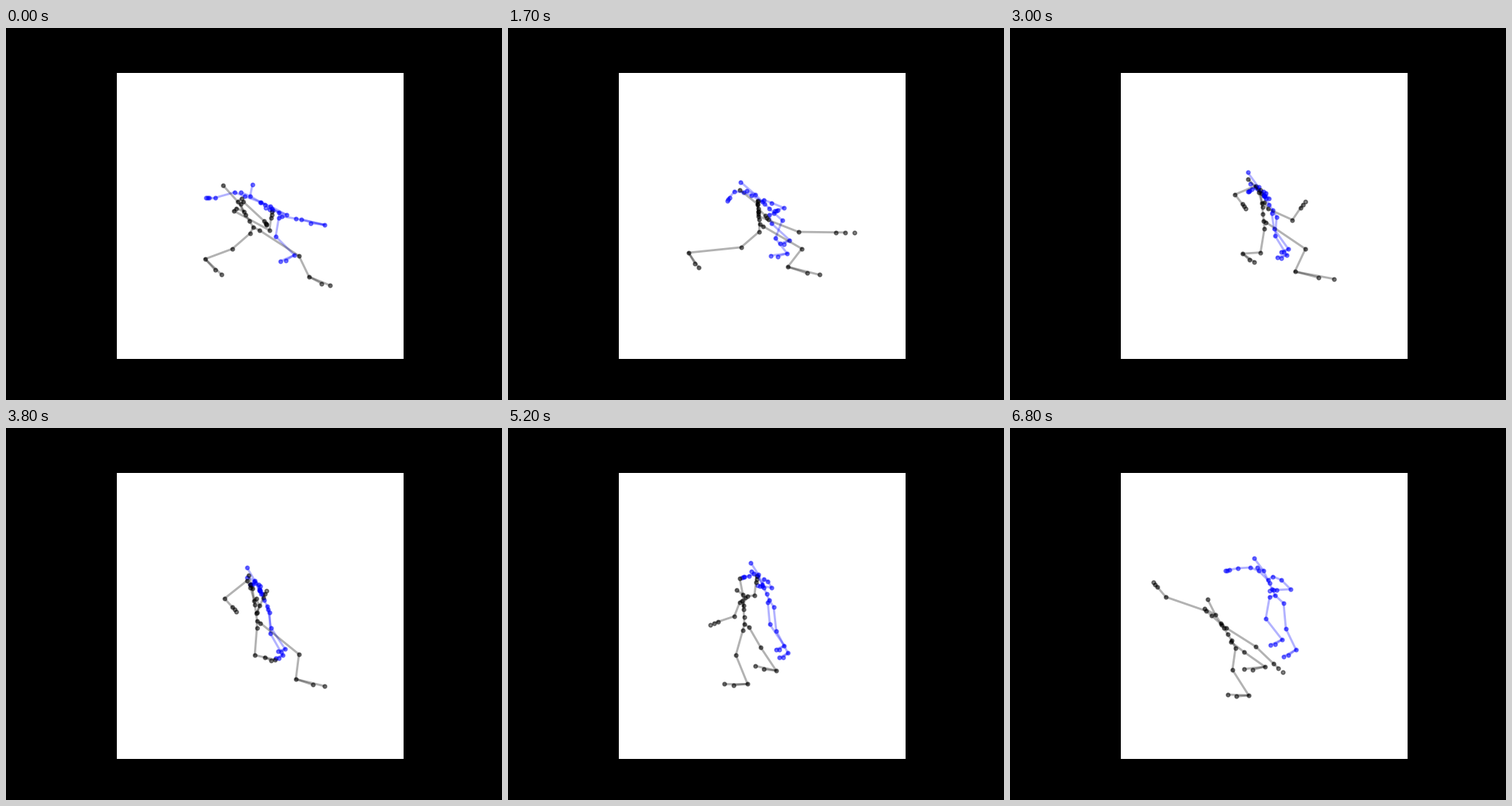
Animation, 640 px wide and 480 px high, one loop 6.9 s. Source, as a matplotlib script:

```python
import numpy as np
import matplotlib.pyplot as plt
from matplotlib.animation import FuncAnimation
from matplotlib.collections import LineCollection

STEP, FRAMES = 100, 69
TIMES = np.arange(FRAMES) * STEP


def path(keys):
    """Smooth curve through {time: x + yj}, sampled once per frame."""
    t = np.array(sorted(keys), float)
    p = np.array([keys[k] for k in sorted(keys)])
    m = np.gradient(p, t)
    i = np.clip(np.searchsorted(t, TIMES, side="right") - 1, 0, len(t) - 2)
    h = t[i + 1] - t[i]
    u = (TIMES - t[i]) / h
    return ((1 + 2 * u) * (1 - u) ** 2 * p[i] + u * (1 - u) ** 2 * h * m[i]
            + u * u * (3 - 2 * u) * p[i + 1] + u * u * (u - 1) * h * m[i + 1])


class Body:
    """Stick figure: a few joints follow paths, the others are placed from them."""

    def __init__(self, ax, color, trunk, arms, legs, shoulder):
        self.joints, self.bones = [], []
        pelvis, neck, head, face, across, hips = map(path, trunk)
        self.chain(*[pelvis + f * (neck - pelvis) for f in (0, 0.25, 0.5, 0.62, 1)], head)
        self.chain(neck, neck + face)
        chest = pelvis + 0.62 * (neck - pelvis)
        for side, (elbow, wrist) in zip((1, -1), arms):
            elbow, wrist = path(elbow), path(wrist)
            mid, half = neck + shoulder, side * across
            reach = wrist - elbow
            self.chain(chest, mid + 0.45 * half, mid + half, elbow, wrist, wrist + 0.25 * reach)
            self.joints.append(wrist + 0.5 * reach)
        for side, (knee, ankle, foot) in zip((1, -1), legs):
            ankle, foot = path(ankle), path(foot)
            self.chain(pelvis, pelvis + 2 + 6j + side * hips, path(knee), ankle, ankle + foot)
            self.chain(ankle, ankle + 0.6 * foot + 2j)
        self.joints = np.array(self.joints)
        self.lines = LineCollection([], colors=color, linewidths=2, alpha=0.3,
                                    capstyle="projecting")
        ax.add_collection(self.lines)
        self.dots = ax.scatter([], [], s=12, c=color, linewidths=1, alpha=0.5)

    def chain(self, *points):
        """Connect points in a row; a first point already in place is shared."""
        last = None
        for p in points:
            same = [i for i, q in enumerate(self.joints) if np.allclose(p, q)]
            if last is None and same:
                last = same[0]
                continue
            self.joints.append(p)
            if last is not None:
                self.bones.append((last, len(self.joints) - 1))
            last = len(self.joints) - 1

    def pose(self, i):
        z = self.joints[:, i]
        xy = np.column_stack([z.real, z.imag])
        self.lines.set_segments([xy[[a, b]] for a, b in self.bones])
        self.dots.set_offsets(xy)


fig = plt.figure(figsize=(6.4, 4.8), dpi=100, facecolor="black")
ax = fig.add_axes([143.2 / 640, 0.11, 369.6 / 640, 0.77])
ax.set(xlim=(143.2, 512.8), ylim=(427.2, 57.6), xticks=[], yticks=[])
ax.spines[:].set_visible(False)

# trunk: pelvis, neck, head, then face, shoulder and hip directions
blue = Body(
    ax, "blue", shoulder=3 + 4j,
    trunk=[
        {0: 352+238j, 2300: 341+238j, 5200: 337+222j, 6800: 342+216j},
        {0: 315+217j, 2300: 320+212j, 3800: 321+197j, 5200: 323+189j, 6800: 327+184j},
        {0: 318+202j, 1000: 303+202j, 3800: 311+180j, 6800: 315+168j},
        {0: -12-5j, 6800: -8-4j},
        {0: -23-9j, 1000: -22-8j, 3600: -4-3j, 6800: -20-8j},
        {0: 2-1j, 1000: -7-3j, 3800: -1-2j, 6800: -9-4j},
    ],
    arms=[
        ({0: 270+219j, 1000: 280+211j, 2300: 303+211j, 3800: 318+202j, 5200: 311+191j,
          6800: 294+181j},
         {0: 262+219j, 1000: 272+220j, 2300: 298+216j, 3800: 316+202j, 5200: 305+192j,
          6800: 283+183j}),
        ({0: 362+241j, 1000: 369+238j, 2300: 342+226j, 3800: 331+214j, 5200: 340+206j,
          6800: 362+208j},
         {0: 344+235j, 1000: 360+243j, 2300: 334+225j, 3800: 328+210j, 5200: 328+204j,
          6800: 344+209j}),
    ],
    legs=[
        ({0: 374+246j, 1000: 346+246j, 2300: 340+258j, 3800: 342+258j, 6800: 330+246j},
         {0: 411+254j, 350: 428+257j, 1000: 381+263j, 2300: 361+282j, 3800: 360+285j,
          6800: 351+273j},
         {0: -30-7j, 1000: -18+2j, 3800: -9+3j, 6800: -15+7j}),
        ({0: 348+269j, 2300: 344+271j, 3800: 341+265j, 6800: 356+259j},
         {0: 372+293j, 1000: 364+291j, 3800: 357+293j, 6800: 369+286j},
         {0: -18+8j, 1000: -22+4j, 3800: -9+4j, 6800: -16+9j}),
    ])

black = Body(
    ax, "black", shoulder=1 + 6j,
    trunk=[
        {0: 319+257j, 1000: 321+257j, 2300: 327+250j, 3800: 324+249j, 5200: 305+253j,
         6800: 286+274j},
        {0: 299+224j, 1000: 314+232j, 2300: 325+220j, 3800: 318+207j, 5200: 303+215j,
         6800: 265+241j},
        {0: 280+203j, 1000: 296+214j, 2300: 300+201j, 3800: 313+190j, 5200: 299+194j,
         6000: 285+214j, 6800: 255+221j},
        {0: 5-4j, 3000: -1-4j, 6800: -14-8j},
        {0: 6-6j, 1000: 5-9j, 2300: -6-11j, 3800: -8-16j, 5200: -5+4j, 6800: 13+11j},
        {0: -6+2j, 3000: -1+4j, 5200: -4+2j, 6800: 3+4j},
    ],
    arms=[
        ({0: 333+249j, 1000: 341+250j, 2300: 304+218j, 3800: 282+220j, 5200: 292+243j,
          6000: 315+266j, 6800: 317+282j},
         {0: 335+252j, 1000: 352+256j, 2300: 310+230j, 3800: 292+231j, 5200: 271+250j,
          6800: 340+304j}),
        ({0: 340+261j, 1000: 347+269j, 2300: 391+255j, 3800: 324+238j, 5200: 318+216j,
          6000: 253+199j, 6800: 201+218j},
         {0: 342+245j, 1000: 372+264j, 2000: 430+258j, 2300: 417+248j, 3800: 332+219j,
          5200: 320+199j, 5600: 241+189j, 6000: 224+182j, 6800: 190+205j}),
    ],
    legs=[
        ({0: 292+285j, 1000: 284+281j, 2300: 317+286j, 3800: 321+293j, 5200: 294+293j,
          6800: 287+312j},
         {0: 257+298j, 1500: 227+290j, 2300: 261+291j, 3800: 334+296j, 5200: 309+330j,
          6000: 315+342j, 6800: 308+345j},
         {0: 21+20j, 2300: 12+17j, 3800: 13+3j, 5200: -30+0j, 6800: -27-1j}),
        ({0: 378+294j, 1000: 380+292j, 2300: 378+280j, 3800: 378+292j, 5200: 326+283j,
          6800: 302+289j},
         {0: 391+321j, 1000: 368+314j, 2300: 360+306j, 3800: 374+324j, 5200: 346+313j,
          6800: 329+308j},
         {0: 27+11j, 2300: 43+10j, 3800: 37+9j, 4200: 9+9j, 5200: -27-6j, 6800: -27+3j}),
    ])


def update(i):
    for body in (blue, black):
        body.pose(i)
    return []


anim = FuncAnimation(fig, update, frames=FRAMES, interval=STEP, repeat=True)
plt.show()
```
